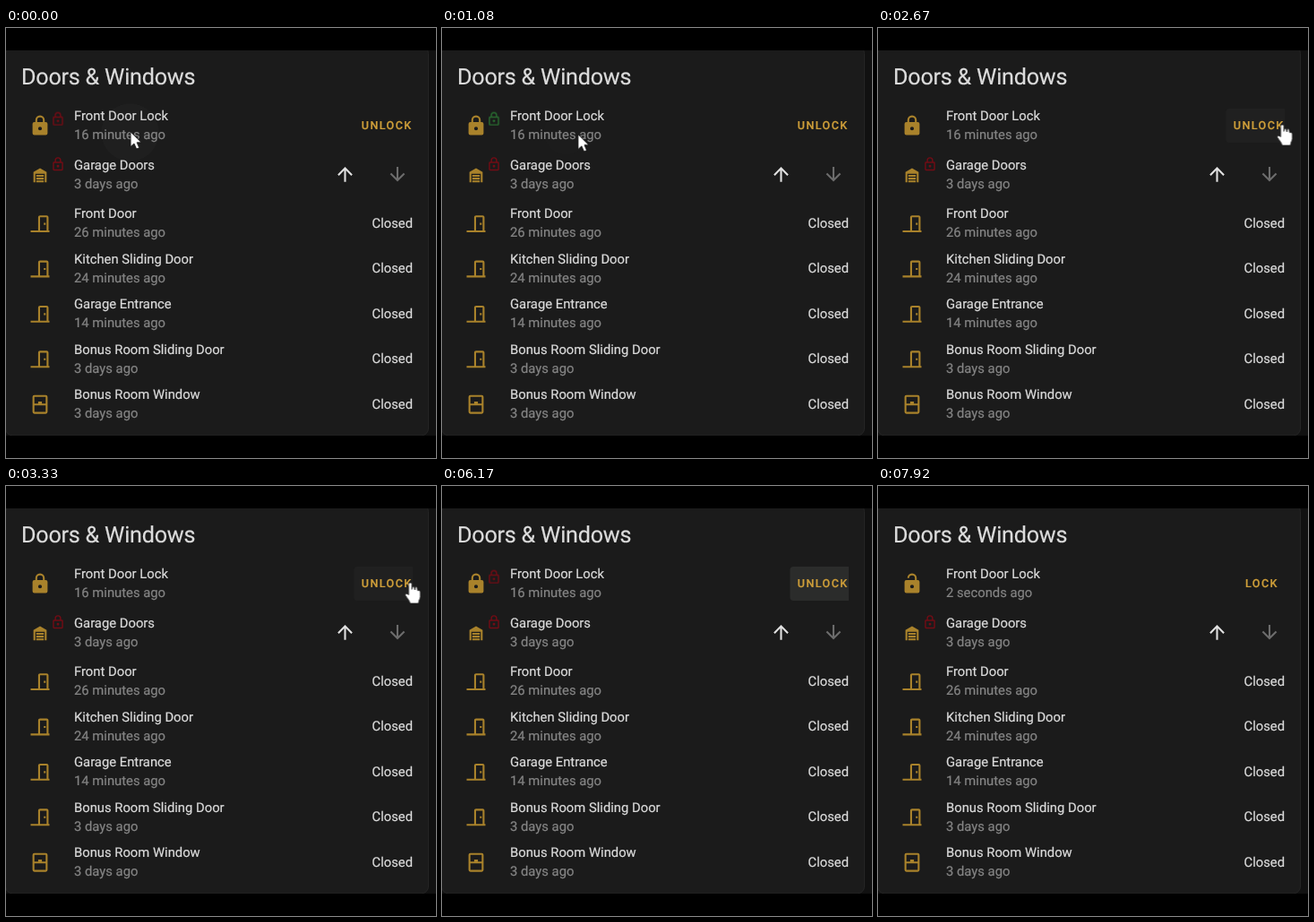
Recreate the animation shown at these times as an HTML page. Size 480 by 480 pixels, loop 8 s.

```html
<!DOCTYPE html>
<html lang="en">
<head>
<meta charset="utf-8">
<title>Doors &amp; Windows</title>
<style>
  html, body { margin: 0; width: 100%; height: 100%; overflow: hidden; background: #000; }
  svg { display: block; width: 480px; height: 480px; }
  text {
    font-family: Roboto, "Open Sans", sans-serif; font-size: 14.8px;
    fill: #dcdcdc; stroke: #dcdcdc; stroke-width: .2px; text-rendering: geometricPrecision;
  }
  .title { font-size: 25.2px; letter-spacing: -0.24px; }
  .sub { fill: #858585; stroke: #858585; }
  .state { text-anchor: end; }
  .action { font-size: 12.6px; font-weight: 500; letter-spacing: 1.4px; fill: #cf9f3a; stroke: #cf9f3a; }
  .icon { fill: #a9822b; }
  #press { transform-origin: 452px 109px; }
</style>
</head>
<body>
<svg viewBox="0 0 480 480">
  <defs>
    <clipPath id="view"><rect y="25" width="480" height="430"/></clipPath>
    <clipPath id="edge"><path d="M454 90V128H392.5A4 4 0 0 1 388.5 124V94A4 4 0 0 1 392.5 90Z"/></clipPath>
  </defs>
  <g clip-path="url(#view)">
    <rect width="480" height="480" fill="#111"/>
    <rect x="-.5" y="20.5" width="472" height="434.5" rx="8" fill="#1b1b1b" stroke="#252525"/>
    <text class="title" x="17" y="62.5">Doors &amp; Windows</text>
    <g clip-path="url(#edge)">
      <rect id="button" x="388" y="90" width="66" height="38" fill="#2b2c2b"/>
      <circle id="press" cx="452" cy="109" r="66" fill="#3a3833"/>
    </g>
    <g id="rows"></g>
    <g id="locked"></g>
    <g id="unlocked"></g>
    <g transform="translate(138.5 116.5)">
      <circle id="hold" r="53" fill="#a0a8a6" fill-opacity=".16"/>
    </g>
  </g>
  <g id="cursor">
    <path id="arrow" d="M0 0V16.5L3.9 13L6.6 19L9.6 17.7L7 11.8H12Z" fill="#fff" stroke="#111" stroke-width=".8"/>
    <path id="hand" d="M-2 1.8C-2-.6 1.6-.6 1.6 1.8V7.4C3-.1 4.6 6.6 5 8C6-.1 8 7.4 8.2 9C9.6 7.8 11 9 11 10.8V15.5C11 18 9.2 19.2 9 23H-.4C-.8 20-3.6 17.4-5.4 14.4C-6.6 12.2-4.2 11.2-2 13.6Z" fill="#fff" stroke="#222" stroke-width=".8"/>
  </g>
</svg>
<script>
const LOOP = 8000;
const SHACKLE = "A5,5 0 0,1 12,1A5,5 0 0,1 17,6V8H18";
const BODY = "M18,8A2,2 0 0,1 20,10V20A2,2 0 0,1 18,22H6A2,2 0 0,1 4,20V10A2,2 0 0,1 6,8H";
const KEYHOLE = "M12,17A2,2 0 0,0 14,15A2,2 0 0,0 12,13A2,2 0 0,0 10,15A2,2 0 0,0 12,17Z";
const INNER = "M12,3A3,3 0 0,0 9,6V8H15V6A3,3 0 0,0 12,3Z";
const ICONS = {
  lock: BODY + "7V6" + SHACKLE + "Z" + INNER + KEYHOLE,
  outline: BODY + "7V6" + SHACKLE + "Z" + INNER + "M18,20V10H6V20H18Z" + KEYHOLE,
  open: BODY + "15V6A3,3 0 0,0 12,3A3,3 0 0,0 9,6H7" + SHACKLE + "Z" + KEYHOLE,
  garage: "M19,20H17V11H7V20H5V9L12,5L19,9V20M8,12H16V14H8V12M8,15H16V17H8V15M16,18V20H8V18H16Z",
  door: "M16,11H18V13H16V11M12,3H19C20.11,3 21,3.89 21,5V19H22V21H2V19H10V5C10,3.89 10.89,3 12,3M12,5V19H19V5H12Z",
  window: "M6,11H10V9H14V11H18V4H6V11M18,13H6V20H18V13M6,2H18A2,2 0 0,1 20,4V20A2,2 0 0,1 18,22H6A2,2 0 0,1 4,20V4A2,2 0 0,1 6,2Z",
  arrow: "M13,20H11V8L5.5,13.5L4.08,12.08L12,4.16L19.92,12.08L18.5,13.5L13,8V20Z"
};
const ROWS = [
  [108.3, "Front Door Lock"],
  [162.9, "Garage Doors", "3 days ago", "garage"],
  [217.6, "Front Door", "26 minutes ago", "door"],
  [268, "Kitchen Sliding Door", "24 minutes ago", "door"],
  [318.4, "Garage Entrance", "14 minutes ago", "door"],
  [368.8, "Bonus Room Sliding Door", "3 days ago", "door"],
  [419.2, "Bonus Room Window", "3 days ago", "window"]
];

const $ = id => document.getElementById(id);

function add(parent, tag, attrs, text) {
  const node = document.createElementNS("http://www.w3.org/2000/svg", tag);
  for (const key in attrs) node.setAttribute(key, attrs[key]);
  if (text) node.textContent = text;
  return $(parent).appendChild(node);
}

function icon(parent, name, x, y, { scale = 1.05, turn = 0, ...rest } = {}) {
  const transform = `translate(${x} ${y}) rotate(${turn}) scale(${scale}) translate(-12 -12)`;
  return add(parent, "path", { d: ICONS[name], class: "icon", "fill-rule": "evenodd", transform, ...rest });
}

const label = (parent, x, y, text, kind = "") => add(parent, "text", { x, y, class: kind }, text);
const badge = (parent, y, color, id = "") =>
  icon(parent, "outline", 58, y, { scale: 0.72, style: `fill:${color}`, id });

for (const [y, name, age, kind] of ROWS) {
  label("rows", 76, y - 5.3, name);
  if (age) label("rows", 76, y + 15.7, age, "sub");
  if (kind) icon("rows", kind, 38, y + 1);
  if (y > 200) label("rows", 454, y + 5.3, "Closed", "state");
}
icon("rows", "arrow", 378.5, 163.3, { style: "fill:#e1e1e1" });
icon("rows", "arrow", 437, 163.3, { turn: 180, style: "fill:#6c6c6c" });
badge("rows", 152.1, "#720c15");

icon("locked", "lock", 38, 109.1);
label("locked", 76, 124, "16 minutes ago", "sub");
label("locked", 396.8, 113, "UNLOCK", "action");
badge("locked", 101.6, "#720c15", "red");
badge("locked", 101.6, "#2c7a35", "green");

icon("unlocked", "open", 38, 109.1);
label("unlocked", 76, 124, "2 seconds ago", "sub");
label("unlocked", 410, 113, "LOCK", "action");

// Each step is [ms, value, easing]; "hard" holds a value until the next step.
function play(id, prop, steps, hard) {
  const all = [...steps, [LOOP, steps[steps.length - 1][1]]];
  const frames = all.map(([ms, value, easing]) => ({
    offset: ms / LOOP,
    [prop]: value,
    easing: hard ? "steps(1, end)" : easing || "linear"
  }));
  $(id).animate(frames, { duration: LOOP, iterations: Infinity });
}

const at = (x, y) => `translate(${x}px, ${y}px)`;

play("cursor", "transform", [
  [0, at(139, 116)], [120, at(147, 115.5)], [1000, at(147, 116), "ease-in-out"],
  [1580, at(272, 188)], [1850, at(300, 202), "ease-in-out"],
  [2450, at(451.5, 108)], [4120, at(451.5, 108)], [4220, at(457, 108)]
]);
play("cursor", "opacity", [[0, 1], [4250, 0]], true);
play("arrow", "opacity", [[0, 1], [80, 0], [1050, 1], [2300, 0]], true);
play("hand", "opacity", [[0, 0], [80, 1], [1050, 0], [2300, 1]], true);

play("hold", "transform", [[0, "scale(.6)", "ease-out"], [170, "scale(1)"], [920, "scale(1)"], [1100, "scale(.4)"]]);
play("hold", "opacity", [[0, 0.25, "ease-out"], [170, 1], [920, 1], [1100, 0]]);

play("red", "opacity", [[0, 1], [920, 1], [920, 0], [5670, 0], [5920, 1]]);
play("green", "opacity", [[0, 0], [920, 0], [920, 1], [2200, 0]]);

play("button", "opacity", [[0, 0], [2330, 0], [2450, 0.35], [3420, 0.35], [3600, 1], [6830, 1], [7150, 0]]);
play("press", "transform", [[0, "scale(.2)"], [3420, "scale(.2)", "ease-out"], [3650, "scale(1)"]]);
play("press", "opacity", [[0, 0], [3420, 0], [3500, 0.5], [3700, 0.5], [4000, 0]]);

play("locked", "opacity", [[0, 1], [6830, 0]], true);
play("unlocked", "opacity", [[0, 0], [6830, 1]], true);
</script>
</body>
</html>
```
